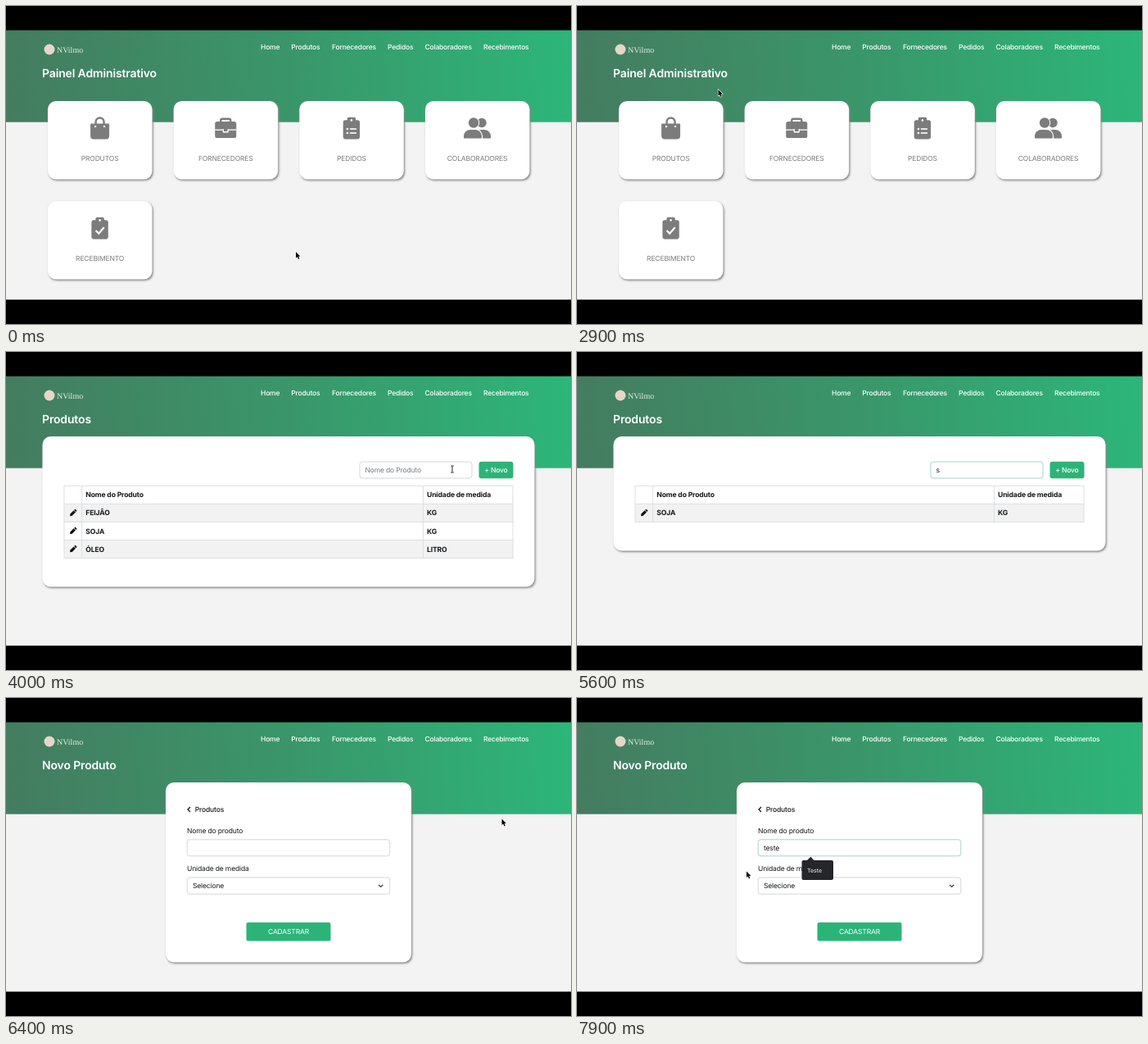
Recreate the animation shown at these times as an HTML page with a canvas. Size 690 by 388 pixels, loop 8 s.

```html
<!DOCTYPE html>
<html lang="pt">
<head>
<meta charset="utf-8">
<title>Painel Administrativo</title>
<style>
html, body { margin: 0; width: 100%; height: 100%; overflow: hidden; background: #000; }
canvas { display: block; width: 690px; height: 388px; }
</style>
</head>
<body>
<canvas id="stage"></canvas>
<script>
const W = 690, H = 388, LOOP = 8000, STEP = 100;
const GREEN = '#2cb478', GREY = '#7c7c7c', INK = '#16181a', LINE = '#dcdfe2', FOCUS = '#a9d3cb';
const SANS = 'Inter, "Liberation Sans", sans-serif';

const canvas = document.getElementById('stage');
const c = canvas.getContext('2d');
const ratio = window.devicePixelRatio || 1;
canvas.width = W * ratio;
canvas.height = H * ratio;
c.textRendering = 'geometricPrecision';

function rect(x, y, w, h, fill) {
  c.fillStyle = fill;
  c.fillRect(x, y, w, h);
}

function round(x, y, w, h, r, fill, stroke) {
  c.beginPath();
  c.roundRect(x, y, w, h, r);
  if (fill) { c.fillStyle = fill; c.fill(); }
  if (stroke) { c.strokeStyle = stroke; c.lineWidth = 1; c.stroke(); }
}

function disc(x, y, r, fill) {
  c.beginPath();
  c.arc(x, y, r, 0, Math.PI * 2);
  c.fillStyle = fill;
  c.fill();
}

function line(points, color, width) {
  c.beginPath();
  points.forEach(([x, y]) => c.lineTo(x, y));
  c.strokeStyle = color;
  c.lineWidth = width;
  c.stroke();
}

function text(s, x, y, { size = 8.5, weight = 400, color = INK, align = 'left', gap = -0.15, family = SANS } = {}) {
  c.font = `${weight} ${size}px ${family}`;
  c.letterSpacing = gap + 'px';
  c.textAlign = align;
  c.fillStyle = color;
  c.fillText(s, x, y);
}

function card(x, y, w, h, r) {
  c.save();
  c.shadowColor = '#858585';
  c.shadowBlur = 2.5 * ratio;
  c.shadowOffsetX = 1.2 * ratio;
  c.shadowOffsetY = 1.6 * ratio;
  round(x, y, w, h, r, '#fff');
  c.restore();
}

function field(x, y, w, h, focused) {
  round(x, y, w, h, 3, '#fff', focused ? FOCUS : '#d3d7db');
}

function caret(x, y) {
  rect(x, y, 1, 11, '#222');
}

// Icons, each drawn around its own centre
function bag() {
  c.beginPath();
  c.moveTo(-5, -4);
  c.lineTo(-5, -7.5);
  c.arc(0, -7.5, 5, Math.PI, 0);
  c.lineTo(5, -4);
  c.strokeStyle = GREY;
  c.lineWidth = 2.4;
  c.stroke();
  round(-11.5, -5.5, 23, 19, [1, 1, 4, 4], GREY);
  disc(-5.5, -2, 1.2, '#fff');
  disc(5.5, -2, 1.2, '#fff');
}

function briefcase() {
  c.beginPath();
  c.roundRect(-6, -11.3, 12, 8, 2);
  c.strokeStyle = GREY;
  c.lineWidth = 2.4;
  c.stroke();
  round(-13, -8, 26, 20, 2.6, GREY);
  rect(-13, 1.5, 26, 1.3, '#fff');
  round(-3.6, 1, 7.2, 4.6, 1, '#fff');
  round(-2.4, 0, 4.8, 4, 1, GREY);
}

function board() {
  round(-10.2, -9.8, 20.4, 23.2, 2.8, GREY);
  round(-5.2, -13.3, 10.4, 7.4, 2, GREY);
  disc(0, -9.6, 1.3, '#fff');
}

function listBoard() {
  board();
  for (const y of [1, 6]) {
    disc(-5, y, 1.3, '#fff');
    rect(-2, y - 0.8, 8, 1.6, '#fff');
  }
}

function checkBoard() {
  board();
  line([[-5, 3], [-1.4, 6.6], [5.2, -1]], '#fff', 2.2);
}

function people() {
  disc(5.5, -6.5, 5.7, GREY);
  round(-3, 2, 19.5, 10.5, [8, 8, 1, 1], GREY);
  disc(-4.5, -6.5, 7.2, '#fff');
  round(-18, 0.8, 24.6, 13, [9, 9, 1, 1], '#fff');
  disc(-4.5, -6.5, 6.2, GREY);
  round(-16.6, 2, 22, 10.5, [8, 8, 1, 1], GREY);
}

function pencil(x, y) {
  c.save();
  c.translate(x, y);
  c.rotate(-Math.PI / 4);
  c.beginPath();
  [[-5.6, 0], [-3.4, -1.6], [2.6, -1.6], [2.6, 1.6], [-3.4, 1.6]].forEach(p => c.lineTo(...p));
  c.fillStyle = '#111';
  c.fill();
  round(3.2, -1.6, 2, 3.2, 0.8, '#111');
  c.restore();
}

const TILES = [
  ['PRODUTOS', bag], ['FORNECEDORES', briefcase], ['PEDIDOS', listBoard],
  ['COLABORADORES', people], ['RECEBIMENTO', checkBoard]
];
const NAV = [
  ['Home', 311], ['Produtos', 348.3], ['Fornecedores', 398], ['Pedidos', 466],
  ['Colaboradores', 511.5], ['Recebimentos', 583]
];
const PRODUCTS = [['FEIJÃO', 'KG'], ['SOJA', 'KG'], ['ÓLEO', 'LITRO']];

function frame(title) {
  rect(0, 0, W, H, '#000');
  rect(0, 30, W, 328.3, '#f3f3f3');
  const g = c.createLinearGradient(0, 110, W, 60);
  g.addColorStop(0, '#447c60');
  g.addColorStop(0.5, '#3a966a');
  g.addColorStop(1, '#2cb679');
  rect(0, 29, W, 112.7, g);
  rect(0, 29, W, 1, 'rgba(0,0,0,.6)');
  disc(53, 53, 6.5, '#e6d6cb');
  text('NVilmo', 62, 57, { size: 10, color: '#e4eee6', gap: 0, family: '"Liberation Serif", serif' });
  for (const [label, x] of NAV) text(label, x, 53, { weight: 500, color: '#fff', gap: -0.2 });
  text(title, 44, 86.5, { size: 14, weight: 600, color: '#fff' });
}

function home() {
  frame('Painel Administrativo');
  TILES.forEach(([label, icon], i) => {
    const x = 51 + (i % 4) * 153.65, y = 116 + Math.floor(i / 4) * 122;
    card(x, y, 127.5, 95.5, 10);
    c.save();
    c.translate(x + 63.6, y + 33);
    icon();
    c.restore();
    text(label, x + 63.6, y + 72.5, { color: GREY, align: 'center' });
  });
}

function list(query, filtered, focused, caretOn) {
  const rows = filtered ? PRODUCTS.filter(([name]) => name.startsWith('S')) : PRODUCTS;
  const top = 163.3, pitch = 22.05;
  const bottom = top + (rows.length + 1) * pitch;
  const bold = { size: 8.6, weight: 700 };
  frame('Produtos');
  card(44.5, 103, 601, bottom - 68, 10);
  field(432, 134, 137, 20, focused);
  text(query || 'Nome do Produto', 438.5, 147, { color: query ? INK : '#777b80' });
  if (caretOn) caret([438, 443, 447][query.length], 138);
  round(577.5, 133.8, 42, 20.4, 3, GREEN);
  text('+ Novo', 598.4, 147, { color: '#fff', weight: 500, align: 'center' });

  text('Nome do Produto', 97.3, top + 14.1, bold);
  text('Unidade de medida', 514, top + 14.1, bold);
  rows.forEach(([name, unit], i) => {
    const y = top + (i + 1) * pitch;
    if (i % 2 === 0) rect(71, y, 548, pitch, '#f2f2f2');
    pencil(82, y + 10.9);
    text(name, 97.3, y + 14.1, bold);
    text(unit, 514, y + 14.1, bold);
  });
  for (let i = 0; i <= rows.length + 1; i++) {
    const y = top + i * pitch;
    line([[70.5, y], [619.5, y]], LINE, 1);
  }
  for (const x of [71, 92.7, 509.5, 619]) line([[x, top], [x, bottom]], LINE, 1);
}

function popup(words) {
  const wide = words.length > 1;
  round(274.5, 198, wide ? 45 : 38.5, 24 + (words.length - 1) * 19.5, 2, '#25262a');
  c.beginPath();
  [[280.5, 198.5], [285.3, 193.8], [290, 198.5]].forEach(p => c.lineTo(...p));
  c.fill();
  words.forEach((w, i) => text(w, 281, 212.6 + i * 19.5, { size: 7, color: '#f2f2f2', gap: 0 }));
}

function form(value, focused, caretOn, words) {
  frame('Novo Produto');
  card(195, 103, 300, 219.5, 10);
  line([[225, 133], [222, 136], [225, 139]], INK, 1.3);
  text('Produtos', 230.7, 139, { weight: 500 });
  text('Nome do produto', 221, 164.8);
  field(221.2, 172.8, 247.6, 20, focused);
  text(value, 228, 186);
  if (caretOn) caret(228, 177);
  text('Unidade de medida', 221, 211.3);
  field(221.2, 219, 247.6, 20.2);
  text('Selecione', 228, 232.3);
  line([[455, 227.8], [457.7, 230.5], [460.4, 227.8]], '#333', 1.2);
  round(293.5, 273.8, 103, 22.6, 2.5, GREEN);
  text('CADASTRAR', 345, 288.4, { color: '#fff', align: 'center' });
  if (words) popup(words);
}

// Pointer path: step, x, y, shape
const PATH = [
  [0, 354, 300, 'arrow'], [17, 354, 300, 'arrow'], [18, 356, 284, 'arrow'], [20, 351, 160, 'arrow'],
  [21, 335, 85, 'arrow'], [22, 326, 53, 'hand'], [28, 326, 53, 'hand'], [29, 172.5, 102, 'arrow'],
  [30, 150, 125, 'hand'], [31, 131, 144, 'arrow'], [32, 129.5, 146, 'arrow'], [33, 140, 147, 'arrow'],
  [34, 210, 155, 'arrow'], [36, 440, 160, 'arrow'], [37, 510, 147, 'beam'], [38, 536, 137, 'beam'],
  [40, 545, 143, 'beam'], [47, 545, 143, 'none'], [58, 548, 143, 'beam'], [59, 575, 146, 'arrow'],
  [60, 600, 146, 'hand'], [61, 600, 146, 'hand'], [62, 601, 147, 'arrow'], [64, 605.5, 147.5, 'arrow'],
  [65, 560, 180, 'arrow'], [67, 380, 250, 'arrow'], [69, 262, 205, 'arrow'], [70, 245, 183, 'beam'],
  [72, 245, 183, 'none'], [78, 244, 184, 'beam'], [79, 207, 211.5, 'arrow']
];

const SHAPES = {
  arrow: [[0, 0], [0, 7.6], [1.8, 6.1], [3, 8.9], [4.3, 8.3], [3.1, 5.6], [5.4, 5.4]],
  hand: [[0, 0], [1.4, 0], [1.6, 3], [5.6, 4], [5.6, 7], [4.6, 9.4], [0.4, 9.4], [-2, 6], [-1.2, 5], [0, 6]]
};

function pointer(n) {
  const i = PATH.findLastIndex(p => p[0] <= n);
  const a = PATH[i], b = PATH[i + 1] || a;
  const k = b === a ? 0 : (n - a[0]) / (b[0] - a[0]);
  if (a[3] === 'none') return;
  c.save();
  c.translate(a[1] + (b[1] - a[1]) * k, a[2] + (b[2] - a[2]) * k);
  if (a[3] === 'beam') {
    line([[0, -3.6], [0, 3.8]], '#222', 1);
    for (const y of [-4, 4]) line([[-1.8, y], [1.8, y]], '#222', 0.9);
  } else {
    c.beginPath();
    SHAPES[a[3]].forEach(p => c.lineTo(...p));
    c.closePath();
    const hand = a[3] === 'hand';
    c.lineJoin = 'round';
    c.lineWidth = hand ? 0.9 : 1.2;
    c.strokeStyle = hand ? '#000' : '#fff';
    c.stroke();
    c.fillStyle = hand ? '#fff' : '#000';
    c.fill();
  }
  c.restore();
}

const within = (n, from, to) => n >= from && n < to;

function draw(ms) {
  const n = Math.floor((ms % LOOP) / STEP);
  c.setTransform(ratio, 0, 0, ratio, 0, 0);
  if (n < 31) {
    home();
  } else if (n < 62) {
    const query = within(n, 49, 54) ? 'so' : within(n, 47, 57) ? 's' : '';
    const caretOn = within(n, 42, 44) || within(n, 47, 51) || within(n, 54, 56);
    list(query, within(n, 48, 58), within(n, 42, 61), caretOn);
  } else {
    const value = 'teste'.slice(0, Math.max(0, n - 71));
    const words = n < 72 ? null : n < 74 ? ['Teste', 'Tomate', 'Trigo'] : ['Teste'];
    form(value, n >= 70, within(n, 70, 72), words);
  }
  pointer(n);
}

const start = performance.now();
function tick() {
  draw(performance.now() - start);
  requestAnimationFrame(tick);
}
tick();
</script>
</body>
</html>
```
